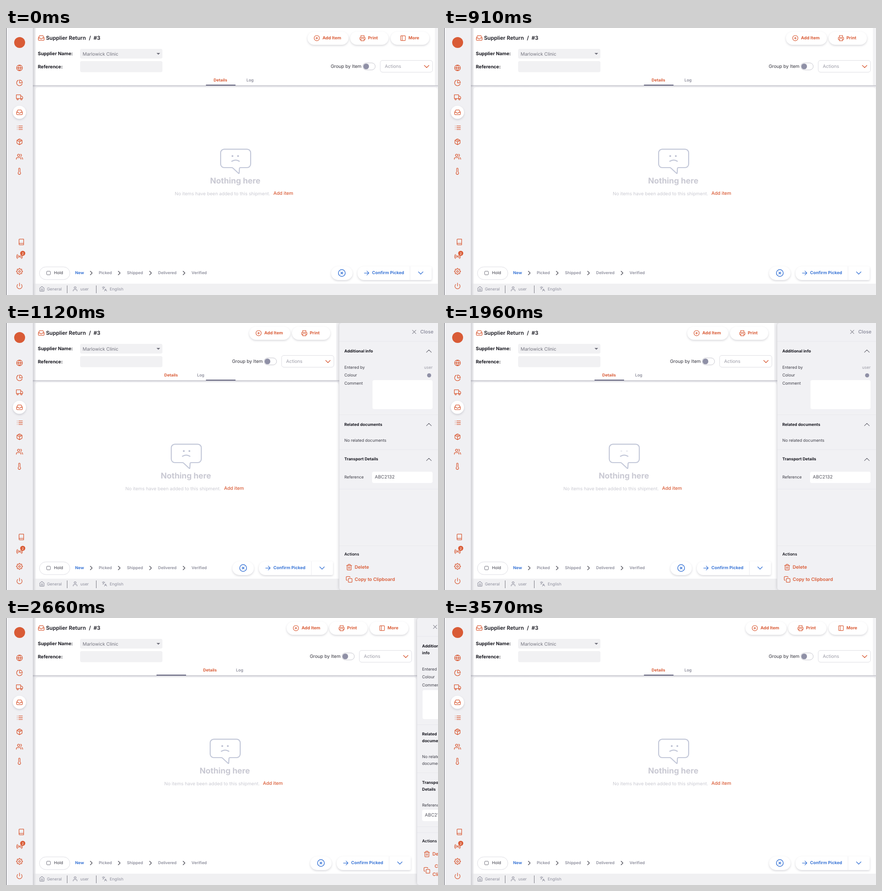
Write an HTML page that moves like this. It is 950 px wide and 589 px high and loops after 3.71 s.

```html
<!DOCTYPE html>
<html lang="en">
<head>
<meta charset="utf-8">
<title>Supplier Return</title>
<style>
html, body { margin: 0; width: 100%; height: 100%; overflow: hidden; background: #f3f3f5; }
body { position: relative; font: 8.87px/15px Inter, sans-serif; color: #3c3c46; }
#stage { position: absolute; left: 0; top: 0; }
#stage text { dominant-baseline: central; text-rendering: geometricPrecision; white-space: pre; }
.lift { filter: drop-shadow(0 2px 2px rgba(40, 40, 60, .18)); }
#panel { position: absolute; top: 0; height: 589px; background: #f1f1f4; border-radius: 5px 0 0 5px;
  box-shadow: 0 0 7px rgba(30, 30, 50, .24); text-rendering: geometricPrecision; }
#panel svg { flex: none; overflow: visible; }
.close { position: absolute; right: 10px; top: 10px; display: flex; align-items: center; gap: 6px;
  font-weight: 600; font-size: 10.6px; line-height: 19px; color: #9091a0; }
.sections { position: absolute; top: 40px; left: 0; right: 0; border-bottom: 1px solid #e8e8ed; }
section { border-top: 1px solid #e8e8ed; padding: 13.5px 12px 12.2px 11px; }
h3 { display: flex; align-items: center; gap: 3px; margin: 0 0 20px; font-size: 8.87px; color: #17171f; }
h3 span { flex: 1; }
h3 svg { margin: -.5px 0; }
.row { display: flex; justify-content: space-between; align-items: center; line-height: 17.5px; white-space: nowrap; }
.row span { color: #9a9aa5; }
.row i { width: 9px; height: 9px; margin-right: 3px; border-radius: 50%; background: #8f90a6; }
.field { display: flex; flex-wrap: wrap; row-gap: 2px; align-items: center; }
.field label { width: 61px; }
.field div { flex: 1 1 70px; box-sizing: border-box; height: 25px; padding-left: 6px; border-radius: 4px;
  background: #fff; font-size: 10.13px; line-height: 24px; color: #55555f; }
.field.tall { align-items: flex-start; row-gap: 0; line-height: 17.5px; }
.field.tall div { height: 64px; margin: 1.5px 0 0 1px; }
.acts { position: absolute; left: 0; right: 0; bottom: 14.5px; padding: 11px 12px 0 11px; border-top: 1px solid #e8e8ed; }
.acts b { color: #17171f; font-weight: 600; }
.act { display: flex; align-items: center; gap: 5px; margin-top: 9px; font-weight: 600; font-size: 10.2px;
  line-height: 18px; color: #d95b36; text-align: center; }
.acts b + .act { margin-top: 11.5px; }
.act svg { margin-left: 2.5px; }
</style>
</head>
<body>
<svg id="stage" width="950" height="589" font-family="Inter, sans-serif"></svg>
<div id="panel"></div>
<script>
const ORANGE = '#d95b36', BLUE = '#3b76d6', GREY = '#8d8e9c', DARK = '#17171f', PALE = '#c2c7d8';
const LOOP = 3710, STEP = 70, STAGE = 950, OPEN = 217, MIN = 92;

const paths = {
  globe: 'M2 12a10 10 0 1 0 20 0a10 10 0 1 0-20 0M2 12h20M12 2a15.3 15.3 0 0 1 4 10 15.3 15.3 0 0 1-4 10 15.3 15.3 0 0 1-4-10 15.3 15.3 0 0 1 4-10z',
  pie: 'M21.2 15.9A10 10 0 1 1 8 2.8M22 12A10 10 0 0 0 12 2v10z',
  truck: 'M1 3h15v13H1zM16 8h4l3 3v5h-7zM3 18.5a2.5 2.5 0 1 0 5 0a2.5 2.5 0 1 0-5 0M16 18.5a2.5 2.5 0 1 0 5 0a2.5 2.5 0 1 0-5 0',
  inbox: 'M22 12h-6l-2 3h-4l-2-3H2M5.5 5.1L2 12v6a2 2 0 0 0 2 2h16a2 2 0 0 0 2-2v-6l-3.5-6.9A2 2 0 0 0 16.8 4H7.2a2 2 0 0 0-1.7 1.1z',
  list: 'M8 6h13M8 12h13M8 18h13M3 6h.01M3 12h.01M3 18h.01',
  box: 'M16.5 9.4l-9-5.2M21 16V8a2 2 0 0 0-1-1.7l-7-4a2 2 0 0 0-2 0l-7 4A2 2 0 0 0 3 8v8a2 2 0 0 0 1 1.7l7 4a2 2 0 0 0 2 0l7-4a2 2 0 0 0 1-1.7zM3.3 7L12 12l8.7-5M12 22V12',
  users: 'M17 21v-2a4 4 0 0 0-4-4H5a4 4 0 0 0-4 4v2M5 7a4 4 0 1 0 8 0a4 4 0 1 0-8 0M23 21v-2a4 4 0 0 0-3-3.9M16 3.1a4 4 0 0 1 0 7.8',
  thermo: 'M14 14.8V3.5a2.5 2.5 0 0 0-5 0v11.3a4.5 4.5 0 1 0 5 0z',
  book: 'M4 19.5A2.5 2.5 0 0 1 6.5 17H20M6.5 2H20v20H6.5A2.5 2.5 0 0 1 4 19.5v-15A2.5 2.5 0 0 1 6.5 2z',
  radio: 'M10 12a2 2 0 1 0 4 0a2 2 0 1 0-4 0M16.2 7.8a6 6 0 0 1 0 8.5M7.8 16.2a6 6 0 0 1 0-8.5M19.1 4.9a10 10 0 0 1 0 14.2M4.9 19.1a10 10 0 0 1 0-14.2',
  power: 'M18.4 6.6a9 9 0 1 1-12.7 0M12 2v10',
  home: 'M3 9l9-7 9 7v11a2 2 0 0 1-2 2H5a2 2 0 0 1-2-2zM9 22V12h6v10',
  user: 'M20 21v-2a4 4 0 0 0-4-4H8a4 4 0 0 0-4 4v2M8 7a4 4 0 1 0 8 0a4 4 0 1 0-8 0',
  lang: 'M5 8l6 6M4 14l6-6 2-3M2 5h12M7 2h1M22 22l-5-10-5 10M14 18h6',
  plus: 'M2 12a10 10 0 1 0 20 0a10 10 0 1 0-20 0M12 8v8M8 12h8',
  print: 'M6 9V2h12v7M6 18H4a2 2 0 0 1-2-2v-5a2 2 0 0 1 2-2h16a2 2 0 0 1 2 2v5a2 2 0 0 1-2 2h-2M6 14h12v8H6z',
  side: 'M5 3h14a2 2 0 0 1 2 2v14a2 2 0 0 1-2 2H5a2 2 0 0 1-2-2V5a2 2 0 0 1 2-2zM9 3v18',
  cancel: 'M2 12a10 10 0 1 0 20 0a10 10 0 1 0-20 0M15 9l-6 6M9 9l6 6',
  arrow: 'M4 12h16M13 5l7 7-7 7',
  down: 'M5 8.5l7 7 7-7', up: 'M4 16l8-8 8 8', right: 'M9 18l6-6-6-6', x: 'M18 6L6 18M6 6l12 12',
  trash: 'M3 6h18M19 6v14a2 2 0 0 1-2 2H7a2 2 0 0 1-2-2V6M8 6V4a2 2 0 0 1 2-2h4a2 2 0 0 1 2 2v2M10 11v6M14 11v6',
  copy: 'M11 9h9a2 2 0 0 1 2 2v9a2 2 0 0 1-2 2h-9a2 2 0 0 1-2-2v-9a2 2 0 0 1 2-2zM5 15H4a2 2 0 0 1-2-2V4a2 2 0 0 1 2-2h9a2 2 0 0 1 2 2v1'
};

// Gear outline: eight rounded lobes around the hub
let gear = 'M9 12a3 3 0 1 0 6 0a3 3 0 1 0-6 0';
for (let i = 0; i <= 64; i++) {
  const a = i / 32 * Math.PI, r = 9.3 + 1.5 * Math.tanh(2 * Math.cos(8 * a));
  gear += `${i ? 'L' : 'M'}${(12 + r * Math.cos(a)).toFixed(1)} ${(12 + r * Math.sin(a)).toFixed(1)}`;
}
paths.gear = gear + 'z';

const icon = (name, cx, cy, color = ORANGE, size = 15.2, line = 2) =>
  `<path d="${paths[name]}" transform="translate(${cx - size / 2} ${cy - size / 2}) scale(${size / 24})"
    fill="none" stroke="${color}" stroke-width="${line}" stroke-linecap="round" stroke-linejoin="round"/>`;
const text = (x, y, str, size = 8.87, weight = 400, fill = DARK, anchor = 'start') =>
  `<text x="${x}" y="${y}" font-size="${size}" font-weight="${weight}" fill="${fill}" text-anchor="${anchor}">${str}</text>`;
const rect = (x, y, w, h, r, fill, more = '') =>
  `<rect x="${x}" y="${y}" width="${w}" height="${h}" rx="${r}" fill="${fill}" ${more}/>`;
const circle = (x, y, r, fill, more = '') => `<circle cx="${x}" cy="${y}" r="${r}" fill="${fill}" ${more}/>`;
const line = (x, y1, y2, color) => `<path d="M${x} ${y1}V${y2}" stroke="${color}"/>`;
const pill = (x, w, name, label) =>
  rect(x, 8, w, 29, 14.5, '#fff', 'class="lift"') + icon(name, x + (w > 85 ? 20.5 : 27), 22.3, ORANGE, 14) +
  text(x + (w > 85 ? 33 : 39), 22.3, label, 9.4, 700, ORANGE);
const inline = (name, size, color, weight) =>
  `<svg width="${size}" height="${size}">${icon(name, size / 2, size / 2, color, size, weight)}</svg>`;

const sideIcons = [['globe', 88], ['pie', 121], ['truck', 153], ['inbox', 186], ['list', 220], ['box', 251],
  ['users', 284], ['thermo', 316], ['radio', 504], ['gear', 537], ['power', 569]];
const stages = [['Picked', 204], ['Shipped', 266], ['Delivered', 334.5], ['Verified', 408]];

stage.innerHTML = `
  <defs>
    <linearGradient id="fall" x2="0" y2="1"><stop stop-color="#d4d4da"/><stop offset="1" stop-color="#d4d4da" stop-opacity="0"/></linearGradient>
    <linearGradient id="edge"><stop stop-color="#28283c" stop-opacity=".17"/><stop offset="1" stop-color="#28283c" stop-opacity="0"/></linearGradient>
  </defs>
  ${rect(0, 0, 950, 589, 0, '#f3f3f5')}
  <rect id="head" x="65" width="878" height="127" fill="#fff"/>
  <rect id="card" x="65" y="131" width="884" height="440" rx="6" fill="#fff"/>
  ${rect(59, 127, 891, 4, 0, 'url(#fall)')}${rect(59, 126.4, 891, 1, 0, '#bfbfc7')}
  ${rect(59, 564, 891, 25, 0, '#f0f0f2')}
  ${icon('inbox', 77.5, 22)}
  ${text(88, 22, 'Supplier Return', 11.7, 600)}${text(182.3, 22, '/', 11.7, 600)}${text(192.5, 22, '#3', 11.7, 600)}
  ${text(70, 56.5, 'Supplier Name:', 10.25, 700)}${text(70, 85.5, 'Reference:', 10.25, 700)}
  ${rect(163, 46, 181, 21.5, 4, '#f1f1f3')}${rect(163, 73, 181, 24.5, 4, '#f1f1f3')}
  ${text(168.5, 58, 'Marlowick Clinic', 10.13, 400, '#73737e')}
  <path d="M331 55h8l-4 4z" fill="#73737e"/>
  <g id="right">
    <g id="tools">${pill(663, 90, 'plus', 'Add Item')}${pill(757, 84, 'print', 'Print')}</g>
    <g id="more">${pill(846, 85, 'side', 'More')}</g>
    ${text(714, 85, 'Group by Item', 10.13, 400, '#33333d')}
    ${rect(784.5, 77, 27.5, 15.5, 7.75, '#fff', 'stroke="#c4c4cc"')}${circle(792, 84.7, 6.3, '#8f90a6')}
    ${rect(823, 71.5, 115, 26, 5, '#fff', 'stroke="#dddde3"')}
    ${text(833, 85, 'Actions', 10.13, 400, '#9a9aa5')}${icon('down', 925, 85, ORANGE, 17, 1.9)}
    ${rect(715, 526, 47, 30, 15, '#fff', 'class="lift"')}${icon('cancel', 738.5, 540.5, BLUE, 18)}
    <path d="M787 526H933a3 3 0 0 1 3 3V553a3 3 0 0 1-3 3H787a14 14 0 0 1-14-14V540a14 14 0 0 1 14-14z" fill="#fff" class="lift"/>
    ${line(888.5, 526, 556, '#ededf1')}
    ${icon('arrow', 793, 540.5, BLUE, 15)}${text(805, 540.5, 'Confirm Picked', 9.4, 700, BLUE)}
    ${icon('down', 912, 540.5, BLUE, 17)}
  </g>
  <g id="middle">
    ${text(471.5, 115.5, 'Details', 8.87, 700, ORANGE, 'middle')}${text(536.7, 115.5, 'Log', 8.87, 600, GREY, 'middle')}
    <path d="M480 267.3H530a8 8 0 0 1 8 8V300a8 8 0 0 1-8 8H515q-1.5 0-1.6 1.5L512.7 320q-.1 1.6-1.4.5L499 309q-1-1-2.5-1H480a8 8 0 0 1-8-8V275.3a8 8 0 0 1 8-8zM496.5 294Q504.7 288.6 513 294"
      fill="none" stroke="${PALE}" stroke-width="2.2" stroke-linecap="round"/>
    <g fill="#bcc0d2"><ellipse class="eye" cy="282.5" rx="2"/><ellipse class="eye" cy="282.5" rx="2"/></g>
    ${text(504, 337, 'Nothing here', 17.5, 700, '#c9c9d3', 'middle')}
    ${text(371, 365.5, 'No items have been added to this shipment.', 10.13, 400, '#cacad2')}
    ${text(588, 365, 'Add item', 10.25, 500, ORANGE)}
  </g>
  <rect id="slider" y="125" width="65" height="2" fill="#5d5d78"/>
  ${rect(73.5, 527, 67, 28, 14, '#fff', 'stroke="#dddde3"')}
  ${rect(89.5, 536.5, 8, 8, 1.5, 'none', 'stroke="#777782"')}${text(105.5, 540.5, 'Hold', 9, 500, '#55555f')}
  ${text(152, 540.5, 'New', 8.87, 700, BLUE)}
  ${stages.map(([name, x]) => text(x, 540.5, name, 8.87, 600, GREY)).join('')}
  ${[187.5, 249, 317.8, 391.5].map(x => icon('right', x, 540.5, '#4c4c56', 16)).join('')}
  ${icon('home', 79, 575.5, GREY, 12.7)}${text(90, 576.5, 'General', 8.87, 400, GREY)}
  ${icon('user', 152, 575.5, GREY, 12.7)}${text(163.5, 576.5, 'user', 8.87, 400, GREY)}
  ${icon('lang', 216.5, 575.5, GREY, 12)}${text(228, 576.5, 'English', 8.87, 400, GREY)}
  ${line(134.5, 568, 585, '#77777f')}${line(198.5, 568, 585, '#77777f')}
  ${rect(59, 0, 7, 589, 0, 'url(#edge)')}
  ${rect(-6, 0, 65, 589, 4, '#f0f0f3')}${rect(0, 0, 1, 589, 0, '#5a5a60')}
  ${circle(30, 32, 12, ORANGE)}${circle(29.5, 186, 14.5, '#fff', 'class="lift"')}
  ${sideIcons.map(([name, y]) => icon(name, name === 'list' ? 30.5 : 29.7, y)).join('')}
  ${icon('book', 33.7, 472)}
  ${circle(36.8, 497, 5.6, ORANGE)}${text(36.8, 497, '2', 7, 500, '#fff', 'middle')}`;

const title = str => `<h3><span>${str}</span>${inline('up', 16, '#666670', 1.7)}</h3>`;
panel.innerHTML = `
  <div class="close">${inline('x', 15.2, '#85858f', 1.8)}Close</div>
  <div class="sections">
    <section>${title('Additional info')}
      <div class="row">Entered by<span>user</span></div>
      <div class="row">Colour<i></i></div>
      <div class="field tall"><label>Comment</label><div></div></div></section>
    <section>${title('Related documents')}No related documents</section>
    <section>${title('Transport Details')}
      <div class="field"><label>Reference</label><div>ABC2132</div></div></section>
  </div>
  <div class="acts"><b>Actions</b>
    <div class="act">${inline('trash', 15.2, ORANGE)}<span>Delete</span></div>
    <div class="act">${inline('copy', 15.2, ORANGE)}<span>Copy to Clipboard</span></div>
  </div>`;

function bezier(x1, y1, x2, y2, x) {
  if (x <= 0) return 0;
  if (x >= 1) return 1;
  const at = (a, b, s) => 3 * a * s * (1 - s) ** 2 + 3 * b * s * s * (1 - s) + s ** 3;
  let lo = 0, hi = 1;
  for (let i = 0; i < 24; i++) {
    const s = (lo + hi) / 2;
    if (at(x1, x2, s) < x) lo = s; else hi = s;
  }
  return at(y1, y2, lo);
}
const ease = x => bezier(.25, .1, .25, 1, x);
const swing = x => bezier(.25, .8, .5, 1, x);
const held = (keys, t) => keys.filter(k => k[0] <= t).pop()[1];

const gaze = [[0, 498], [140, 497], [210, 496], [420, 500], [910, 497.5], [980, 495.7], [1050, 498], [1120, 499.5],
  [1540, 498.5], [2870, 500], [3010, 498], [3150, 496], [3360, 499.5], [3570, 500.8]];
const lids = [[0, 1], [1750, .8], [1820, .55], [1890, .4], [1960, .25], [2100, 1]];
const eyes = document.querySelectorAll('.eye');
const shift = (el, x) => el.setAttribute('transform', `translate(${x})`);

function draw(now) {
  const t = Math.floor(now % LOOP / STEP) * STEP;
  // The drawer animates a generous max-width, capped by its real width
  const w = Math.min(OPEN, 731 * (ease((t - 910) / 500) - ease((t - 2314) / 500)));
  const open = t >= 910 && t < 2310;

  shift(right, -w);
  shift(middle, -w / 2);
  shift(tools, open ? 89 : 0);
  more.style.display = open ? 'none' : '';
  head.setAttribute('width', 878 - w);
  card.setAttribute('width', 884 - w);
  slider.setAttribute('x', 439.7 - 108.7 * (swing((t - 1170) / 300) - swing((t - 2850) / 300)));

  eyes.forEach((eye, i) => {
    eye.setAttribute('cx', held(gaze, t) + 12.3 * i);
    eye.setAttribute('ry', 2 * held(lids, t));
  });

  panel.style.display = w > 0 ? '' : 'none';
  panel.style.left = STAGE - w + 'px';
  panel.style.width = Math.max(MIN, w) + 'px';
}

const start = performance.now();
function tick() {
  draw(performance.now() - start);
  requestAnimationFrame(tick);
}
tick();
</script>
</body>
</html>
```
